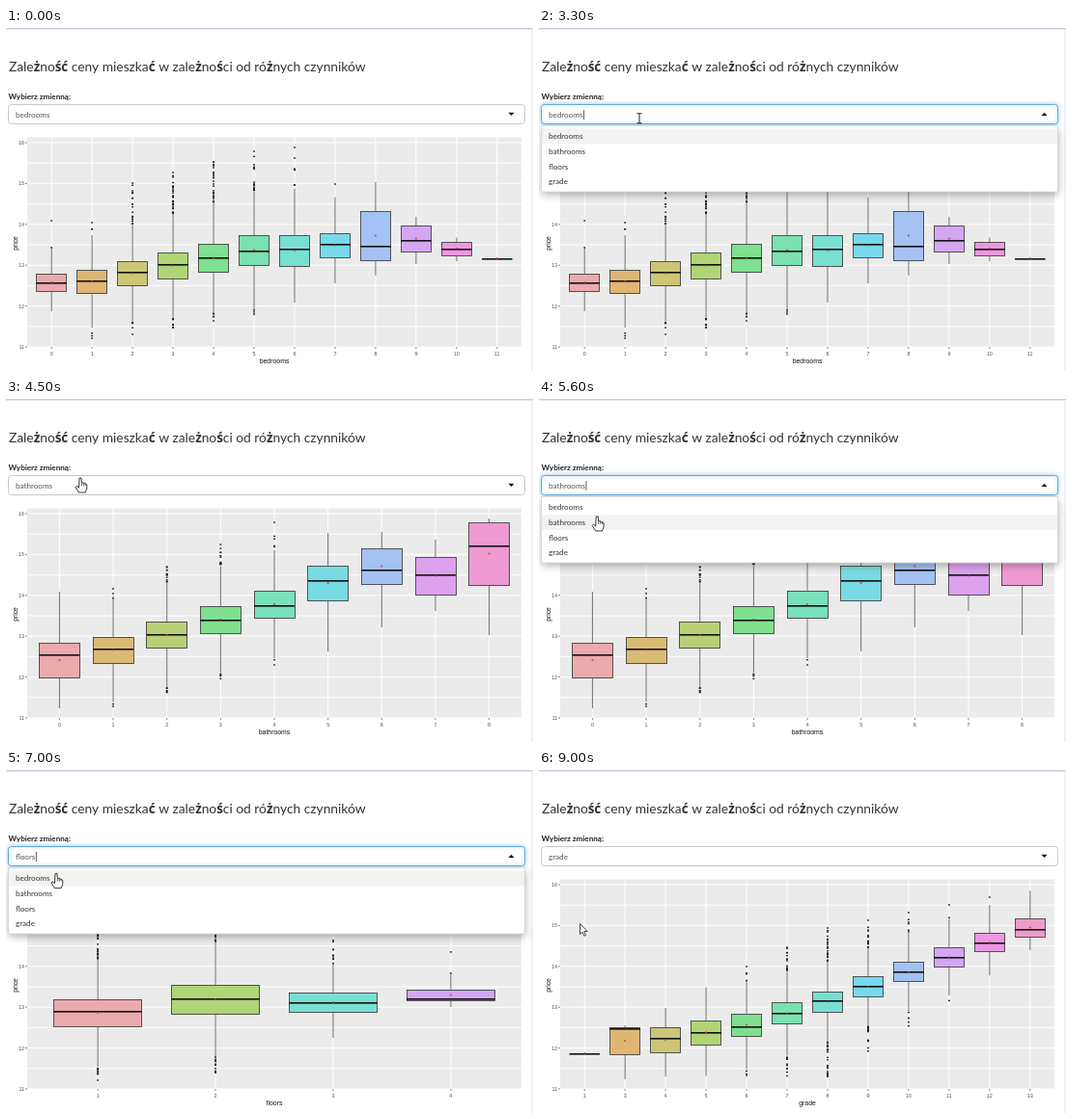
An HTML page with a canvas for the animation above (9.2 s loop, 546x356 px).

```html
<!DOCTYPE html>
<html lang="pl">
<head>
<meta charset="utf-8">
<style>
html, body { margin: 0; width: 100%; height: 100%; overflow: hidden; background: #fff; }
canvas { display: block; }
</style>
</head>
<body>
<canvas id="stage" width="546" height="356"></canvas>
<script>
const ctx = document.getElementById('stage').getContext('2d');
const LOOP = 9200, STEP = 100, REDRAW_DELAY = 300;
const UI = 'Lato, "Open Sans", sans-serif';
const ALT = '"Noto Sans", sans-serif';
const PLOT = '"Liberation Sans", Arial, sans-serif';
const PANEL = { x: 22, y: 113.5, w: 512, h: 217.5 };
const WHEEL = ['#ebaaad', '#dfb673', '#ccc676', '#b0d576', '#7fe08f', '#7ae1b0',
  '#78e0d2', '#78d9ec', '#a4c2f4', '#d4a6f3', '#ee97e2', '#f09bcb'];

// keys: category, highest point, q3, median, q1, lowest point; the rest is interpolated.
// peak and spread say which categories hold the most data, and so the most outliers.
const CHARTS = [
  {
    name: 'bedrooms', labels: [...Array(12).keys()], peak: 3.5, spread: 2,
    keys: [[0, 200, 255, 264, 273, 294], [1, 202, 251, 262, 275, 322],
      [2, 161, 242, 253, 267, 318], [5, 128, 215, 231, 246, 297],
      [6, 124, 215, 229, 247, 285], [7, 162, 213, 224, 238, 265],
      [8, 160, 190, 226, 241, 257], [9, 196, 205, 220, 232, 245],
      [11, 239, 239, 239, 239, 239]]
  },
  {
    name: 'bathrooms', labels: [...Array(9).keys()], peak: 2.3, spread: 1.3,
    keys: [[0, 200, 253, 265, 289, 321], [1, 197, 247, 259, 274, 319],
      [4, 128, 199, 214, 227, 276], [5, 139, 173, 188, 209, 262],
      [6, 138, 155, 177, 192, 237], [7, 146, 164, 182, 203, 220],
      [8, 124, 128, 152, 193, 245]]
  },
  {
    name: 'floors', labels: [1, 2, 3, 4], peak: 0.6, spread: 1.4,
    keys: [[0, 146, 238, 250, 266, 322], [1, 125, 223, 237, 253, 314],
      [2, 163, 231, 241, 251, 278], [3, 160, 228, 237, 239, 246]]
  },
  {
    name: 'grade', labels: [1, ...Array.from({ length: 11 }, (_, i) => i + 3)], peak: 6, spread: 2,
    keys: [[0, 294, 294, 294, 294, 294], [1, 265, 267, 268, 295, 321],
      [2, 247, 267, 278, 293, 318], [4, 204, 253, 266, 276, 317],
      [6, 164, 230, 239, 251, 318], [11, 124, 154, 165, 173, 187]]
  }
];

// when the list opens and when the next variable is picked
const PICKS = [[3200, 3900], [5200, 6000], [6800, 7500]];
const MENU = { x: 2.5, y: 101.5, w: 535, h: 68.5, first: 104.5, row: 15.7 };

// pointer: time, x, y
const PATH = [[1200, 43, 160], [1900, 107, 111], [2700, 107, 111], [3100, 104, 93],
  [3400, 104, 94], [3800, 88, 128], [4500, 77, 82], [5200, 76, 88], [5900, 50, 144],
  [6400, 49, 145], [6800, 54, 90], [7400, 46, 158], [7600, 46, 160], [9000, 43, 160]];

const linear = u => u;
const smooth = u => u * u * (3 - 2 * u);
const snap = v => Math.floor(v) + 0.5;

// values of rows [position, ...values] at a position between them
function sample(rows, pos, ease) {
  const next = rows.findIndex(r => r[0] > pos);
  if (next < 0) return rows[rows.length - 1].slice(1);
  const [p0, ...a] = rows[next - 1], [p1, ...b] = rows[next];
  const u = ease((pos - p0) / (p1 - p0));
  return a.map((v, i) => v + (b[i] - v) * u);
}

function randomFrom(seed) {
  return () => (seed = seed * 16807 % 2147483647) / 2147483647;
}

function fillAt(part) {
  const pos = part * WHEEL.length, i = Math.floor(pos);
  const next = WHEEL[(i + 1) % WHEEL.length];
  return `color-mix(in srgb, ${next} ${Math.round((pos - i) * 100)}%, ${WHEEL[i]})`;
}

function text(str, x, y, font, color, align = 'left') {
  ctx.font = font;
  ctx.fillStyle = color;
  ctx.textAlign = align;
  ctx.fillText(str, x, y);
}

function line(x1, y1, x2, y2, color, width) {
  ctx.strokeStyle = color;
  ctx.lineWidth = width;
  ctx.beginPath();
  ctx.moveTo(x1, y1);
  ctx.lineTo(x2, y2);
  ctx.stroke();
}

function rect(x, y, w, h, color) {
  ctx.fillStyle = color;
  ctx.fillRect(x, y, w, h);
}

function poly(points, x, y, fill, stroke) {
  ctx.beginPath();
  points.forEach(([px, py]) => ctx.lineTo(x + px, y + py));
  ctx.closePath();
  ctx.fillStyle = fill;
  ctx.fill();
  if (!stroke) return;
  ctx.strokeStyle = stroke;
  ctx.lineWidth = 0.9;
  ctx.stroke();
}

function drawHeader() {
  rect(0, 0, 546, 356, '#fff');
  rect(0, 0, 546, 1.5, '#d3c8e0');
  rect(544.5, 2, 1, 354, '#e3e0e8');
  let x = 3;
  for (const run of 'Zależność ceny mieszkać w zależności od różnych czynników'.split(/([śćż]+)/)) {
    const font = /[śćż]/.test(run) ? '600 13.4px ' + ALT : '13.8px ' + UI;
    text(run, x, 45, font, '#333');
    x += ctx.measureText(run).width;
  }
  text('Wybierz zmienną:', 2.5, 74, 'bold 8.1px ' + UI, '#222');
}

function drawAxes(chart, step, first) {
  const { x, y, w, h } = PANEL, bottom = y + h;
  rect(x, y, w, h, '#ebebeb');
  for (let v = 11; v <= 16; v += 0.5) {
    const gy = 331 - (v - 11) * 42.4;
    line(x, gy, x + w, gy, '#fff', 1);
    if (v % 1) continue;
    line(x - 2, gy, x, gy, '#555', 0.7);
    text(v, x - 3, gy + 2, '5.4px ' + PLOT, '#4d4d4d', 'right');
  }
  chart.labels.forEach((label, i) => {
    const cx = first + i * step;
    line(cx, y, cx, bottom, '#fff', 1);
    line(cx, bottom, cx, bottom + 2, '#555', 0.7);
    text(label, cx, 339.5, '5.4px ' + PLOT, '#4d4d4d', 'center');
  });
  text(chart.name, 278, 347.6, '6.9px ' + PLOT, '#111', 'center');
  ctx.save();
  ctx.translate(11.7, 223.5);
  ctx.rotate(-Math.PI / 2);
  text('price', 0, 0, '6.7px ' + PLOT, '#111', 'center');
  ctx.restore();
}

// points from the whisker's end to the extreme, thinning out on the way
function drawOutliers(x, end, extreme, density, random) {
  const gap = extreme - end;
  if (Math.abs(gap) < 4) return;
  const dot = y => rect(x - 0.9, y - 0.7, 1.8, 1.4, '#1a1a1a');
  dot(extreme);
  const count = Math.round(Math.abs(gap) * density * 0.7);
  for (let k = 0; k < count; k++) dot(end + gap * random() ** 1.8);
}

function drawChart(chart) {
  const count = chart.labels.length, step = PANEL.w / (count + 0.2);
  const first = PANEL.x + step * 0.6, w = step * 0.75;
  const random = randomFrom(4711);
  drawAxes(chart, step, first);
  for (let i = 0; i < count; i++) {
    const [high, q3, median, q1, low] = sample(chart.keys, i, linear);
    const cx = first + i * step, x = cx - w / 2;
    const reach = 1.5 * (q1 - q3);
    const top = Math.max(high, q3 - reach), bottom = Math.min(low, q1 + reach);
    const density = Math.exp(-(((i - chart.peak) / chart.spread) ** 2));
    line(cx, top, cx, q3, '#4a4a4a', 0.8);
    line(cx, q1, cx, bottom, '#4a4a4a', 0.8);
    drawOutliers(cx, top, high, density, random);
    drawOutliers(cx, bottom, low, density, random);
    if (q1 > q3) {
      const box = [snap(x), snap(q3), Math.round(w), Math.round(q1 - q3)];
      rect(...box, fillAt(i / count));
      ctx.strokeStyle = '#444';
      ctx.lineWidth = 0.9;
      ctx.strokeRect(...box);
    }
    rect(x, Math.floor(median), w, 1.6, '#111');
    rect(cx - 0.8, (q1 + q3) / 2 - 0.8, 1.6, 1.6, '#d03038');
  }
}

function drawSelect(value, open) {
  ctx.save();
  if (open) {
    ctx.shadowColor = 'rgba(102,175,233,.7)';
    ctx.shadowBlur = 4;
  }
  ctx.beginPath();
  ctx.roundRect(2.5, 79.5, 535, 20, 3);
  ctx.fillStyle = '#fff';
  ctx.fill();
  ctx.strokeStyle = open ? '#66a9dc' : '#c8c8c8';
  ctx.lineWidth = 1;
  ctx.stroke();
  ctx.restore();
  text(value, 10, 92.5, '8.1px ' + UI, '#555');
  if (open) rect(10.5 + ctx.measureText(value).width, 85, 0.8, 10, '#333');
  const tip = open ? -1.6 : 1.6;
  poly([[-3, -tip], [3, -tip], [0, tip]], 523.5, 89.3, '#111');
}

function drawMenu(active) {
  const { x, y, w, h, first, row } = MENU;
  ctx.save();
  ctx.shadowColor = 'rgba(0,0,0,.3)';
  ctx.shadowBlur = 8;
  ctx.shadowOffsetY = 3;
  rect(x, y, w, h, '#fff');
  ctx.restore();
  ctx.strokeStyle = '#d4d4d4';
  ctx.lineWidth = 0.8;
  ctx.strokeRect(x, y, w, h);
  rect(x + 0.5, first + active * row, w - 1, row, '#f3f3f3');
  CHARTS.forEach((c, i) => text(c.name, 10, first + 10.7 + i * row, '8.1px ' + UI, '#333'));
}

function drawArrow(x, y) {
  poly([[0, 0], [0, 11], [2.5, 8.8], [4.3, 12.8], [6, 12], [4.2, 8.2], [7.6, 8]],
    x - 0.5, y - 0.5, '#fff', '#333');
}

function drawBeam(x, y) {
  line(x, y - 4.5, x, y + 4.5, '#222', 1);
  for (const s of [-5, 5]) line(x - 2.5, y + s, x + 2.5, y + s, '#222', 1);
}

function drawHand(x, y) {
  poly([[-1, 0], [1, 0], [1.4, 5], [3.5, 5], [5.2, 5.8], [6.8, 6.8], [6.8, 11],
    [5.2, 15], [-1.5, 15], [-5, 9.5], [-4, 8.3], [-1.5, 10]], x, y, '#fff', '#222');
  for (const dx of [1.4, 3.4, 5.2]) line(x + dx, y + 5.5, x + dx, y + 8, '#222', 0.7);
}

function drawPointer(x, y, open) {
  if (y > 79 && y < 100) (open ? drawBeam : drawHand)(x, y);
  else if (open && y > MENU.first) drawHand(x, y);
  else drawArrow(x, y);
}

function draw(t) {
  const picked = PICKS.filter(([, pick]) => t >= pick).length;
  const shown = PICKS.filter(([, pick]) => t >= pick + REDRAW_DELAY).length;
  const open = PICKS.some(([from, pick]) => t >= from && t < pick);
  const pointer = t < PATH[0][0] ? null : sample(PATH, t, smooth);
  drawHeader();
  drawChart(CHARTS[shown]);
  drawSelect(CHARTS[picked].name, open);
  if (open) {
    const over = Math.floor((pointer[1] - MENU.first) / MENU.row);
    drawMenu(CHARTS[over] ? over : picked);
  }
  if (pointer) drawPointer(...pointer, open);
}

const start = performance.now();
function tick() {
  const t = (performance.now() - start) % LOOP;
  draw(Math.min(Math.floor(t / STEP) * STEP, LOOP - 2 * STEP));
  requestAnimationFrame(tick);
}
tick();
</script>
</body>
</html>
```
